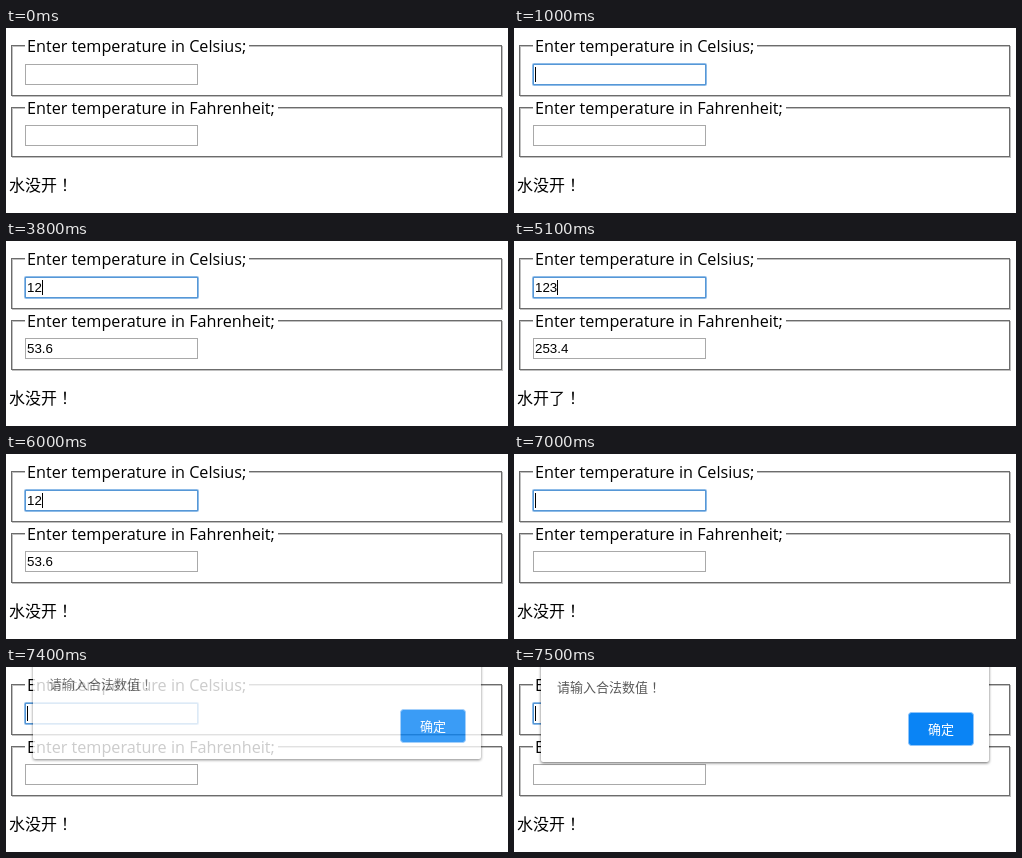
Animation of 502 by 185 pixels, one loop 8 s. Source, as an HTML page:

```html
<!DOCTYPE html>
<html lang="zh-CN">
<head>
<meta charset="utf-8">
<title>Temperature converter</title>
<style>
  html, body { margin: 0; width: 100%; height: 100%; overflow: hidden; background: #fff; }
  svg { display: block; width: 502px; height: 185px; }
  text { white-space: pre; }
  .legend { font: 16.2px "Open Sans", "Noto Sans", sans-serif; }
  .value { font: 13.333px "Liberation Sans", Arial, sans-serif; }
  .cjk { font: 16px "Noto Sans CJK SC", "Noto Sans CJK", sans-serif; }
  .mark { font-family: "Noto Sans CJK JP", "Noto Sans CJK", sans-serif; }
  .small { font-size: 13px; }
  .line { fill: none; stroke-width: 1; }
  #panel { filter: drop-shadow(0 1px 1.5px rgba(0, 0, 0, .6)); }
</style>
</head>
<body>
<svg viewBox="0 0 502 185">
  <g id="form"></g>
  <g id="ring" class="line">
    <rect x="18.5" y="35.5" width="174" height="22" rx="1" stroke="#8dbbe8"/>
    <rect x="19.5" y="36.5" width="172" height="20" stroke="#5697d6"/>
  </g>
  <text id="celsius" class="value" x="21" y="51"></text>
  <text id="fahrenheit" class="value" x="21" y="112"></text>
  <rect id="caret" y="39" width="1" height="15"/>
  <text class="cjk" x="3" y="163"><tspan id="verdict"></tspan><tspan class="mark" lang="ja">！</tspan></text>
  <g id="dialog">
    <rect id="panel" x="27" y="-40" width="448" height="135" rx="2" fill="#fff"/>
    <text class="cjk small" x="43" y="25" fill="#5a5a5a">请输入合法数值<tspan class="mark" lang="ja">！</tspan></text>
    <rect x="394.5" y="45.5" width="65" height="33" rx="3" fill="#0a84f5" stroke="#8ec5fb"/>
    <text class="cjk small" x="427" y="67" fill="#fff" text-anchor="middle">确定</text>
  </g>
</svg>
<script>
const LOOP = 8000;
const $ = id => document.getElementById(id);

const box = (x, y, w, h, color) =>
  `<rect class="line" x="${x + .5}" y="${y + .5}" width="${w - 1}" height="${h - 1}" stroke="${color}"/>`;

// Etched frame with a gap for its legend, and one input
const fieldset = (top, bottom, gapEnd, baseline, inputY, label) =>
  box(6, top + 1, 491, bottom - top - 1, '#c0c0c0') +
  box(5, top, 491, bottom - top - 1, '#6c6c6c') +
  `<rect x="19" y="${top}" width="${gapEnd - 19}" height="2" fill="#fff"/>` +
  `<text class="legend" x="21" y="${baseline}">${label}</text>` +
  box(19, inputY, 173, 21, '#a9a9a9');

$('form').innerHTML =
  fieldset(17, 69, 243, 24, 36, 'Enter temperature in Celsius;') +
  fieldset(79, 130, 272, 86, 97, 'Enter temperature in Fahrenheit;');

// [start, typed text, caret shown]
const typing = [
  [0, '', 0], [1000, '', 1], [1500, '', 0],
  [1700, '1', 1], [1800, '12', 1],
  [2300, '12', 0], [2800, '12', 1], [3300, '12', 0], [3800, '12', 1],
  [4100, '123', 1], [4600, '123', 0], [5100, '123', 1], [5600, '123', 0],
  [6000, '12', 1], [6200, '1', 1], [6500, '1', 0],
  [6900, '', 0], [7000, '', 1]
];
// [start, opacity, dx, dy]
const drop = [[0, 0, 0, 0], [7300, .28, 1, -12], [7400, .8, 0, -3], [7500, 1, 0, 0]];
const caretX = [21, 28, 36, 43];

const at = (steps, t) => steps.findLast(s => s[0] <= t);

function draw(t) {
  const [, typed, caret] = at(typing, t);
  const [, opacity, dx, dy] = at(drop, t);
  $('celsius').textContent = typed;
  $('fahrenheit').textContent = typed && (typed * 9 / 5 + 32).toFixed(1);
  $('verdict').textContent = typed >= 100 ? '水开了' : '水没开';
  $('ring').style.opacity = t >= 1000 ? 1 : 0;
  $('caret').style.opacity = caret;
  $('caret').setAttribute('x', caretX[typed.length]);
  $('dialog').style.opacity = opacity;
  $('dialog').setAttribute('transform', `translate(${dx} ${dy})`);
}

const start = performance.now();
function tick() {
  draw((performance.now() - start) % LOOP);
  requestAnimationFrame(tick);
}
tick();
</script>
</body>
</html>
```
